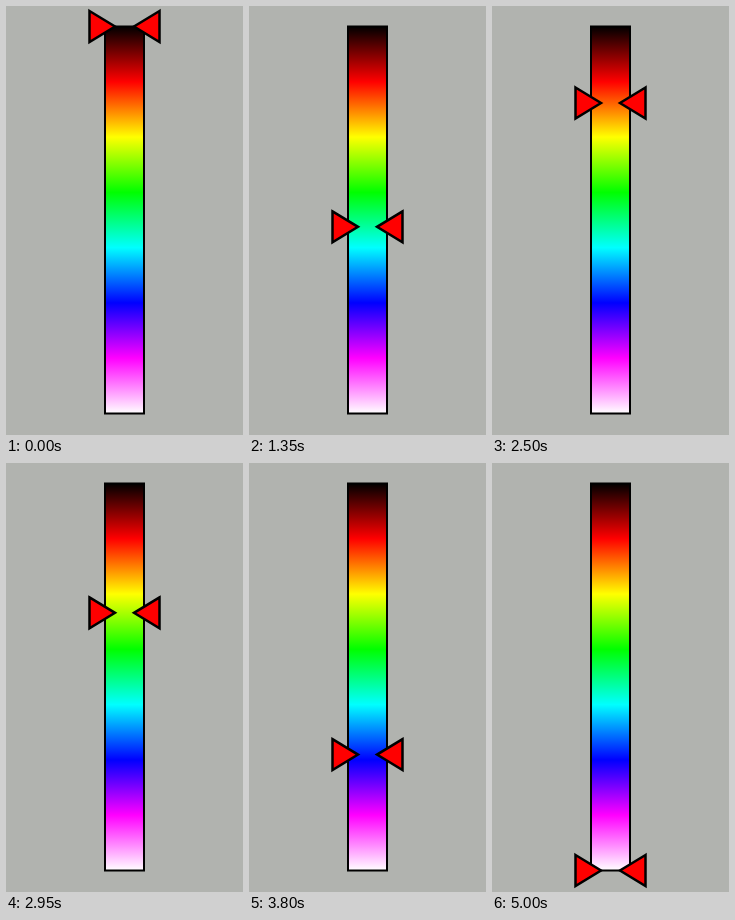
An HTML page with a canvas that plays this animation: 237x429 px, repeating every 5050 ms.

```html
<!DOCTYPE html>
<html lang="en">
<head>
<meta charset="utf-8">
<title>Colour scale</title>
<style>
html, body { margin: 0; width: 100%; height: 100%; overflow: hidden; background: #b1b3af; }
canvas { display: block; }
</style>
</head>
<body>
<canvas id="stage" width="237" height="429"></canvas>
<script>
const stage = document.getElementById('stage');
const ctx = stage.getContext('2d');
const LOOP = 5050, TICK = 50;
const bar = { x: 99, y: 20.5, w: 39, h: 387 };
const bottom = bar.y + bar.h;

// turning points of the markers: [time in ms, height]
const turns = [[130, bar.y], [1503, 246], [1595, 246], [2567, 86], [4495, bottom]];

function markerY(t) {
  const i = turns.findIndex(p => p[0] > t);
  if (i === 0) return bar.y;
  if (i < 0) return bottom;
  const [t0, y0] = turns[i - 1], [t1, y1] = turns[i];
  return y0 + (y1 - y0) * (t - t0) / (t1 - t0);
}

// black, then the hues from red to magenta, then white
function spectrum() {
  const fill = ctx.createLinearGradient(0, bar.y, 0, bottom);
  fill.addColorStop(0, '#000');
  for (let i = 0; i < 6; i++) fill.addColorStop((i + 1) / 7, `hsl(${60 * i}, 100%, 50%)`);
  fill.addColorStop(1, '#fff');
  return fill;
}
const rainbow = spectrum();

function drawBar() {
  ctx.fillStyle = rainbow;
  ctx.fillRect(bar.x, bar.y, bar.w, bar.h);
  ctx.lineWidth = 2;
  ctx.strokeRect(bar.x, bar.y, bar.w, bar.h);
}

function drawMarker(base, tip, y) {
  ctx.beginPath();
  ctx.moveTo(base, y - 15.5);
  ctx.lineTo(tip, y);
  ctx.lineTo(base, y + 15.5);
  ctx.closePath();
  ctx.fillStyle = '#f00';
  ctx.fill();
  ctx.lineWidth = 2.5;
  ctx.stroke();
}

function draw(t) {
  ctx.fillStyle = '#b1b3af';
  ctx.fillRect(0, 0, stage.width, stage.height);
  ctx.strokeStyle = '#000';
  drawBar();
  const y = markerY(t);
  drawMarker(83.5, 109, y);
  drawMarker(153.5, 128, y);
}

const start = performance.now();
function frame() {
  const t = (performance.now() - start) % LOOP;
  draw(Math.floor(t / TICK) * TICK);
  requestAnimationFrame(frame);
}
frame();
</script>
</body>
</html>
```
